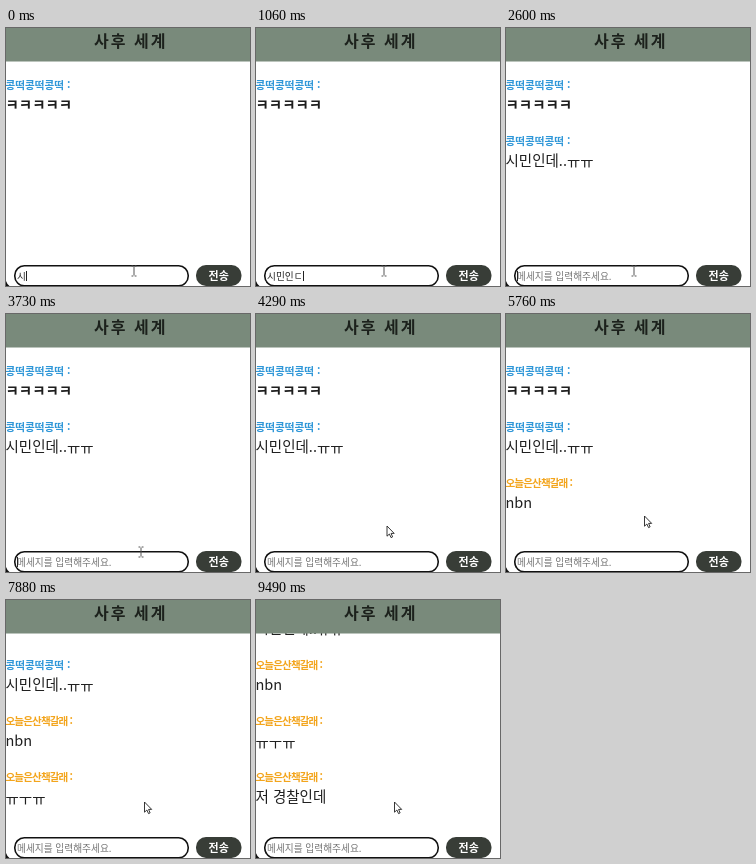
An HTML page for the animation above (9.55 s loop, 244 px wide and 258 px high).

```html
<!DOCTYPE html>
<html lang="ko">
<head>
<meta charset="utf-8">
<title>사후 세계</title>
<style>
  html, body { margin: 0; width: 100%; height: 100%; overflow: hidden; background: #fff; }
  svg { display: block; width: 244px; height: 258px; }
  text { font-family: "Noto Sans CJK KR", "Noto Sans CJK", sans-serif; white-space: pre; }
  .title { font-size: 16px; font-weight: 700; letter-spacing: 2px; fill: #1c211c; }
  .name { font-size: 10.6px; font-weight: 700; }
  .body { font-size: 14.5px; font-weight: 500; fill: #1e1e1e; }
  .laugh { font-size: 14.5px; font-weight: 700; }
  .field { font-size: 9.7px; }
  .send { font-size: 11px; font-weight: 900; fill: #fff; }
</style>
</head>
<body>
<svg viewBox="0 0 244 258">
  <rect width="244" height="258" fill="#fff"/>
  <g id="log"></g>
  <rect width="244" height="33.5" fill="#798a7b"/>
  <text class="title" x="88" y="18.5">사후 세계</text>
  <path d="M0 253Q1 256 3.5 258H0Z" fill="#111"/>
  <rect x="8.8" y="237.8" width="173.4" height="20" rx="9.5" fill="#fff" stroke="#111" stroke-width="1.6"/>
  <text id="field" class="field" x="11" y="251.7"></text>
  <rect id="caret" y="243" width="1" height="10" fill="#222"/>
  <rect x="190" y="237" width="45.5" height="21" rx="10" fill="#383d37"/>
  <text class="send" x="212.7" y="252" text-anchor="middle">전송</text>
  <path id="beam" d="M-2.5 -5H-.7M.7 -5H2.5M0 -4.5V4.5M-2.5 5H-.7M.7 5H2.5" fill="none" stroke="#555" stroke-width="1"/>
  <path id="arrow" d="M0 0V10.2L2.4 8L4 11.6L5.6 10.9L4.1 7.4H7.2Z" fill="#fff" stroke="#222" stroke-width=".9"/>
</svg>
<script>
const LOOP = 9550, PITCH = 56, SENT = 2530;
const BLUE = '#2f97d8', ORANGE = '#f3a51d';
const KIM = ['콩떡콩떡콩떡 :', BLUE, 0], LEE = ['오늘은산책갈래 :', ORANGE, -.9];

const messages = [
  { at: 0, who: KIM, runs: [['ㅋㅋㅋㅋㅋ', 0, 'laugh']] },
  { at: SENT, who: KIM, runs: [['시민인데..', 0], ['ㅠㅠ', 2.5]] },
  { at: 5020, who: LEE, runs: [['nbn', 0]] },
  { at: 6290, who: LEE, runs: [['ㅠㅜㅠ', 3]] },
  { at: 8350, who: LEE, runs: [['저 경찰인데', 0]] }
];
const scrolls = [[0, 0], [6290, 48], [8350, 104]];
const typing = [
  [0, '시'], [190, '시ㅁ'], [260, '시미'], [400, '시민'],
  [660, '시민ㅇ'], [760, '시민이'], [860, '시민인'],
  [1060, '시민인ㄷ'], [1130, '시민인데'], [1330, '시민인데.'],
  [1530, '시민인데..'], [1800, '시민인데..ㅠ'], [2000, '시민인데..ㅠㅠ']
];
const mouse = [
  [0, 128, 243], [3590, 128, 243], [3870, 142, 233], [4290, 131, 212],
  [4550, 131, 212], [4760, 138, 205.5], [4950, 138, 205.5], [5090, 138.5, 202]
];

const $ = id => document.getElementById(id);
const field = $('field'), caret = $('caret'), log = $('log');

function add(parent, tag, attrs, text = '') {
  const el = document.createElementNS('http://www.w3.org/2000/svg', tag);
  for (const key in attrs) el.setAttribute(key, attrs[key]);
  el.textContent = text;
  return parent.appendChild(el);
}

messages.forEach((m, i) => {
  const [name, fill, gap] = m.who;
  m.el = add(log, 'g', { transform: `translate(0 ${i * PITCH})` });
  add(m.el, 'text', { class: 'name', x: -.5, y: 61, fill, 'letter-spacing': gap }, name);
  const line = add(m.el, 'text', { class: 'body', x: -.5, y: 81.5 });
  for (const [text, dy, cls = ''] of m.runs) add(line, 'tspan', { dy, class: cls }, text);
});

// Latest row whose start time has passed
const latest = (rows, t) => rows.filter(row => row[0] <= t).pop();

function mouseAt(t) {
  const next = mouse.findIndex(row => row[0] > t);
  if (next < 0) return mouse[mouse.length - 1].slice(1);
  const [t0, x0, y0] = mouse[next - 1], [t1, x1, y1] = mouse[next];
  const k = (t - t0) / (t1 - t0);
  return [x0 + (x1 - x0) * k, y0 + (y1 - y0) * k];
}

function show(el, on) {
  el.setAttribute('visibility', on ? 'visible' : 'hidden');
}

function draw(t) {
  for (const m of messages) show(m.el, t >= m.at);
  log.setAttribute('transform', `translate(0 ${-latest(scrolls, t)[1]})`);

  const writing = t < SENT;
  const text = writing ? latest(typing, t)[1] : '메세지를 입력해주세요.';
  if (field.textContent !== text) field.textContent = text;
  field.setAttribute('fill', writing ? '#222' : '#757575');
  caret.setAttribute('x', writing ? 11 + Math.round(field.getComputedTextLength()) : 11);
  show(caret, writing || Math.floor((t - 2600) / 530) % 2 === 0 || t < 2600);

  const [x, y] = mouseAt(Math.floor(t / 10) * 10);
  const inside = y > 237;
  show($('beam'), inside);
  show($('arrow'), !inside);
  for (const id of ['beam', 'arrow']) $(id).setAttribute('transform', `translate(${x} ${y})`);
}

const start = performance.now();
function tick() {
  draw((performance.now() - start) % LOOP);
  requestAnimationFrame(tick);
}
tick();
</script>
</body>
</html>
```
